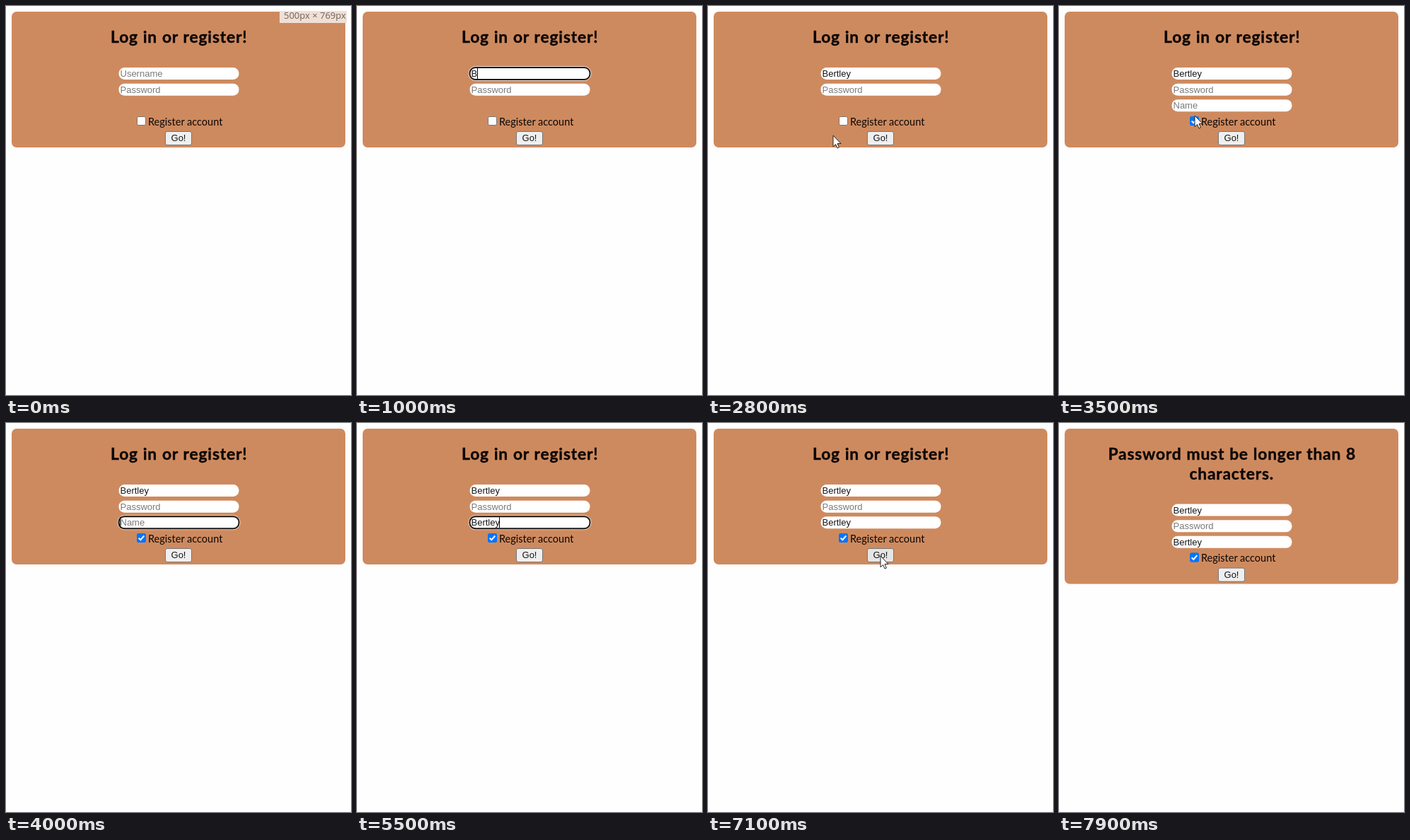
These frames come from a looping animation (488x550 px, 8 s). An HTML page:

```html
<!DOCTYPE html>
<html lang="en">
<head>
<meta charset="utf-8">
<title>Log in form</title>
<style>
  html, body { margin: 0; width: 100%; height: 100%; overflow: hidden; background: #fefefe; }
  svg { display: block; }
  .head {
    font: 700 22.8px Lato, sans-serif; letter-spacing: .8px; word-spacing: .6px;
    text-anchor: middle; fill: #0c0705; stroke: #0c0705; stroke-width: .4;
  }
  .label { font: 14.5px Lato, sans-serif; fill: #0c0705; }
  .ui { font: 13px "Liberation Sans", Arial, sans-serif; fill: #161616; }
  .size { font: 13px "Open Sans", sans-serif; fill: #6b625d; }
  .ui.hint { fill: #7a7a7a; }
  .field { fill: #fff; }
  .ring { fill: #fff; stroke: #1a1a1a; stroke-width: 1.9; }
  .halo { fill: none; stroke: #fff; stroke-opacity: .7; }
</style>
</head>
<body>
<svg width="488" height="550" viewBox="0 0 488 550">
  <rect id="card" x="8" y="8" width="472" height="192" rx="7" fill="#ce8a5f"/>
  <text id="line1" class="head" x="244.8" y="52"></text>
  <text id="line2" class="head" x="244.3" y="80">characters.</text>
  <g id="form">
    <g id="fields"></g>
    <g id="box">
      <rect x="185.5" y="156.5" width="12" height="12" rx="2" fill="#fff" stroke="#767676"/>
      <g id="check">
        <rect x="185" y="156" width="13" height="13" rx="2.5" fill="#0075ff"/>
        <path d="M187.7 162.6l2.6 2.7 5-5.8" fill="none" stroke="#fff" stroke-width="2"/>
      </g>
    </g>
    <text class="label" x="201" y="168.6">Register account</text>
    <rect id="button" x="225.5" y="177.5" width="37" height="19" rx="2.5" stroke="#767676"/>
    <text class="ui" x="244" y="191.3" text-anchor="middle">Go!</text>
  </g>
  <g id="size">
    <rect x="387" y="7" width="95" height="17" fill="#f0dfd4"/>
    <text class="size" x="393" y="18">500px × 769px</text>
  </g>
  <path id="mouse" d="M0 0V15.8L3.6 12.5 6 18 8.4 17 6.1 11.5H11Z" fill="#fff" stroke="#222" stroke-width="1"/>
</svg>
<script>
const LOOP = 8000, TICK = 100, SHIFT = 27.6;
const NAME = "Bertley";
const $ = id => document.getElementById(id);
const show = (el, on) => el.setAttribute("visibility", on ? "inherit" : "hidden");
const within = (t, [from, to]) => t >= from && t < to;

function add(parent, tag, attrs) {
  const el = document.createElementNS("http://www.w3.org/2000/svg", tag);
  for (const key in attrs) el.setAttribute(key, attrs[key]);
  return parent.appendChild(el);
}

// keys: the time at which each letter is typed
function makeField(y, hint, { from = 0, focus = [0, 0], carets = [], keys = [] } = {}) {
  const g = add($("fields"), "g", {});
  add(g, "rect", { class: "field", x: 159.5, y, width: 170, height: 17, rx: 8.2 });
  const ring = add(g, "g", {});
  add(ring, "rect", { class: "halo", x: 158, y: y - 1.5, width: 173, height: 20, rx: 9.5 });
  add(ring, "rect", { class: "ring", x: 159.5, y, width: 170, height: 17, rx: 8 });
  const text = add(g, "text", { x: 161.5, y: y + 13 });
  const caret = add(g, "rect", { y: y + 1, width: 1, height: 15 });

  return t => {
    const typed = NAME.slice(0, keys.filter(k => t >= k).length);
    text.textContent = typed || hint;
    text.setAttribute("class", typed ? "ui" : "ui hint");
    caret.setAttribute("x", Math.round(161 + (typed ? text.getComputedTextLength() : 0)));
    show(g, t >= from);
    show(ring, t >= from && within(t, focus));
    show(caret, carets.some(span => within(t, span)));
  };
}

const fields = [
  makeField(87, "Username", {
    focus: [200, 2600],
    carets: [[200, 700], [900, 2300]],
    keys: [900, 1100, 1500, 1600, 1600, 1700, 1800]
  }),
  makeField(109.7, "Password"),
  makeField(132.2, "Name", {
    from: 3400,
    focus: [4000, 6500],
    carets: [[4000, 4500], [4700, 6100]],
    keys: [4700, 4900, 5200, 5300, 5300, 5400, 5500]
  })
];

// pointer trips: [time, x, y]
const trips = [
  [[2400, 103, 330], [2500, 115, 306], [2600, 170, 217], [2700, 173, 208],
   [2800, 177, 183], [3000, 190, 166], [3400, 190, 166], [3500, 192, 155], [3600, 192, 150]],
  [[6200, 98, 347], [6300, 115, 306], [6400, 165, 285], [6500, 192, 250],
   [6600, 200, 243], [6900, 244, 188], [7800, 244, 188]]
];

function pointerAt(t) {
  const trip = trips.find(p => within(t, [p[0][0], p[p.length - 1][0]]));
  if (!trip) return null;
  const i = trip.findIndex(p => p[0] > t);
  const [t0, x0, y0] = trip[i - 1], [t1, x1, y1] = trip[i];
  const k = (t - t0) / (t1 - t0);
  return [x0 + (x1 - x0) * k, y0 + (y1 - y0) * k];
}

function draw(t) {
  const failed = t >= 7400;
  $("line1").textContent = failed ? "Password must be longer than 8" : "Log in or register!";
  show($("line2"), failed);
  $("card").setAttribute("height", failed ? 192 + SHIFT : 192);
  $("form").setAttribute("transform", `translate(0 ${failed ? SHIFT : 0})`);
  fields.forEach(update => update(t));
  show($("check"), t >= 3400);
  show($("size"), t < 400);
  $("button").setAttribute("fill", within(t, [6900, 7400]) ? "#e5e5e5" : "#efefef");
  const p = pointerAt(t);
  show($("mouse"), p);
  if (p) $("mouse").setAttribute("transform", `translate(${p})`);
}

const start = performance.now();
function frame() {
  const t = (performance.now() - start) % LOOP;
  draw(Math.floor(t / TICK) * TICK);
  requestAnimationFrame(frame);
}
frame();
</script>
</body>
</html>
```
